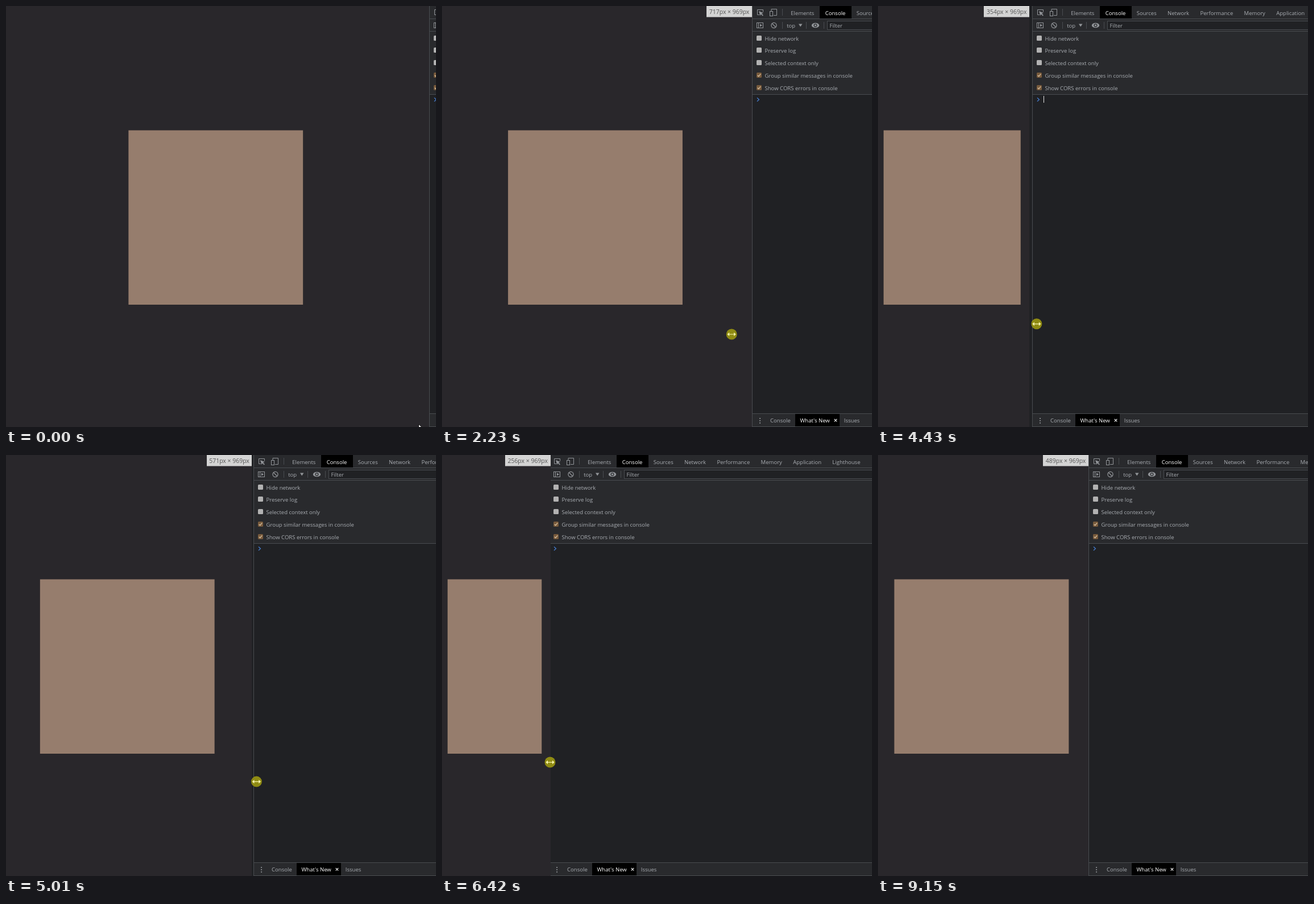
These frames come from a looping animation (756x740 px, 9.31 s). An HTML page with a canvas:

```html
<!DOCTYPE html>
<html lang="en">
<head>
<meta charset="utf-8">
<title>Resizing a page</title>
<style>
html, body { margin: 0; width: 100%; height: 100%; overflow: hidden; background: #29272b; }
canvas { display: block; }
</style>
</head>
<body>
<canvas id="stage" width="756" height="740"></canvas>
<script>
const ctx = document.getElementById('stage').getContext('2d');
const LOOP = 9310, W = 756, H = 740;
const FONT = '"Open Sans", "Noto Sans", sans-serif';
const C = {
  page: '#29272b', box: '#967d6d', panel: '#202124', bar: '#292a2d', line: '#494c50',
  text: '#a9adb2', bright: '#ffffff', icon: '#919498', check: '#775a3c'
};

// Each drag eases from one divider position to the next;
// the tools panel and the page trail the pointer by their own lag.
const SWINGS = [
  { start: 1060, time: 2568, from: 743.5, to: 193, panelLag: 118, pageLag: 118 },
  { start: 3960, time: 1225, from: 193, to: 450, panelLag: 16, pageLag: 32 },
  { start: 5185, time: 1235, from: 450, to: 187, panelLag: 58, pageLag: 94 },
  { start: 6770, time: 1483, from: 187, to: 370, panelLag: 77, pageLag: 154 }
];
const GRAB = 660, DRAG = 1100, RELEASE = 8300, LEAVE = 8400, GONE = 8690;

const clamp = u => Math.min(1, Math.max(0, u));
const ease = u => (1 - Math.cos(Math.PI * clamp(u))) / 2;
const mix = (a, b, u) => a + (b - a) * u;

function divider(t, lagName) {
  const s = SWINGS.findLast(s => t >= s.start) || SWINGS[0];
  return mix(s.from, s.to, ease((t - s.start - (s[lagName] || 0)) / s.time));
}

// The hand sinks along a shallow curve towards the right
const handY = x => 582 - 40 * Math.exp((197 - x) / 150);

function rect(x, y, w, h, color) {
  ctx.fillStyle = color;
  ctx.fillRect(x, y, w, h);
}

// Returns the width of the drawn text
function text(str, x, y, color = C.text, size = 9.55) {
  ctx.font = `${size}px ${FONT}`;
  ctx.fillStyle = color;
  ctx.fillText(str, x, y);
  return ctx.measureText(str).width;
}

function oval(x, y, rx, ry, color) {
  ctx.beginPath();
  ctx.ellipse(x, y, rx, ry, 0, 0, 7);
  ctx.fillStyle = color;
  ctx.fill();
}

function frame(x, y, w, h) {
  ctx.strokeStyle = C.icon;
  ctx.lineWidth = 1;
  ctx.strokeRect(x, y, w, h);
}

// Path strings keep small glyphs compact
function glyph(d, x, y, { fill, stroke, width = 1 }) {
  ctx.save();
  ctx.translate(x, y);
  const path = new Path2D(d);
  if (fill) { ctx.fillStyle = fill; ctx.fill(path); }
  if (stroke) { ctx.strokeStyle = stroke; ctx.lineWidth = width; ctx.stroke(path); }
  ctx.restore();
}

function drawIcons() {
  const pen = { stroke: C.icon }, ink = { fill: C.icon };
  // element picker, device toggle
  glyph('M4 9H0V0H10V4', 9.5, 6.5, pen);
  glyph('M0 0L8 3L5 4.2L8 7.2L6.7 8.4L3.8 5.4L2.5 8Z', 12, 9, ink);
  glyph('M0 4V0H9.5V11H4', 34, 5.5, pen);
  frame(31.5, 9.5, 5, 8);
  // sidebar toggle, clear, menu arrow
  frame(8.5, 29.5, 11, 9);
  rect(11, 30, 1, 8, C.icon);
  glyph('M0 0L4 2.5L0 5Z', 14, 31.5, ink);
  oval(38.5, 34, 5.2, 5.2, C.icon);
  oval(38.5, 34, 3.9, 3.9, C.bar);
  glyph('M0 0L6.4 6.4', 35.3, 30.8, { ...pen, width: 1.3 });
  glyph('M0 0H6.5L3.2 5Z', 82, 31.5, ink);
  // eye
  oval(111.5, 34, 6.7, 4.3, C.icon);
  oval(111.5, 34, 3, 3, C.bar);
  oval(111.5, 34, 1.8, 1.8, C.icon);

  rect(53, 5, 1, 12, C.line);
  for (const x of [53, 95, 126]) rect(x, 28, 1, 12, C.line);
}

function drawTabs() {
  const gap = 19.3;
  let x = 68.3;
  for (const name of ['Elements', 'Console', 'Sources', 'Network', 'Performance',
    'Memory', 'Application', 'Lighthouse']) {
    const active = name === 'Console';
    if (active) rect(119, 0, 56, 22, '#000');
    x += text(name, x, 15.5, active ? C.bright : C.text) + gap;
  }
}

function drawOption(label, i) {
  const y = Math.floor(52 + i * 21.8), on = i > 2;
  ctx.beginPath();
  ctx.roundRect(8, y, 9, 9, 1.5);
  ctx.fillStyle = on ? C.check : '#b2b2b2';
  ctx.fill();
  if (on) glyph('M0 2.4L1.9 4.3L5.4 0', 9.8, y + 2.4, { stroke: '#d8c0a0', width: 1.3 });
  text(label, 22.5, 60.5 + i * 21.9);
}

function drawDrawer() {
  for (let i = 0; i < 3; i++) rect(13.2, 724 + i * 4, 1.8, 1.8, C.icon);
  rect(76, 717, 78, 22, '#000');
  text('Console', 32, 732.3);
  text("What's New", 84.5, 732.3, C.bright);
  glyph('M0 0L4.6 4.6M4.6 0L0 4.6', 144.7, 726, { stroke: '#e4e4e4', width: 1.2 });
  text('Issues', 161.8, 732.3);
}

function drawPanel(edge, caret) {
  const w = W - edge;
  ctx.save();
  ctx.translate(edge, 0);
  rect(0, 0, w, H, C.panel);
  rect(0, 0, w, 155, C.bar);
  rect(0, 716, w, 24, C.bar);
  for (const y of [22, 44, 155, 716, 739]) rect(0, y, w, 1, C.line);

  drawIcons();
  drawTabs();
  text('top', 61.2, 37.5);
  rect(132, 26, w, 16, C.line);
  rect(133, 27, w, 14, C.panel);
  text('Filter', 136.5, 38.2);

  ['Hide network', 'Preserve log', 'Selected context only',
    'Group similar messages in console', 'Show CORS errors in console'].forEach(drawOption);

  glyph('M0 0L3.4 3.2L0 6.4', 9, 161.3, { stroke: '#4479c8', width: 1.4 });
  if (caret) rect(20, 158, 1, 12, '#e4e4e4');
  drawDrawer();
  rect(0, 0, 1, H, C.line);
  ctx.restore();
}

function drawPage(edge, label) {
  rect(0, 0, Math.round(edge), H, C.page);
  // 400px box, centred, shrinking once the margins are used up
  const size = Math.min(306.8, edge - 25.2);
  const left = Math.max(9.8, (edge - 6 - size) / 2);
  rect(left, 218.5, size, 306.5, C.box);
  if (label) {
    const x = Math.round(edge - 79.7);
    rect(x, 0, Math.round(edge) - x, 19.5, '#d4d4d4');
    text(`${Math.round((edge + 5.7) / 0.7677)}px × 969px`, edge - 75.2, 13.8, '#555', 10.45);
  }
}

function drawArrow(x, y) {
  glyph('M0 0V14L3.2 11L5.4 16L7.6 15L5.4 10.2L10 10Z', x, y, { fill: '#fff', stroke: '#111' });
}

function drawResizer(x, y, press) {
  ctx.globalAlpha = press;
  oval(x, y, 9.5, 9.5, '#8f8b13');
  ctx.globalAlpha = 1;
  glyph('M-7.5 0L-4 -3.3V-.6H4V-3.3L7.5 0L4 3.3V.6H-4V3.3Z', x, y,
    { fill: press > 0 ? '#fbf8b0' : '#fff' });
}

function drawPointer(t) {
  if (t < 300) {
    const u = ease(t / 350);
    drawArrow(mix(725.5, 746.5, u), mix(735, 582, u));
  } else if (t < LEAVE) {
    const x = divider(t) + 3;
    drawResizer(x, handY(x), t < RELEASE ? clamp((t - GRAB) / 60) : 0);
  } else if (t < GONE) {
    const u = ease((t - LEAVE) / (GONE - LEAVE));
    drawArrow(mix(373, 615, u), mix(570, 735, u));
  }
}

function draw(t) {
  const blink = (t + 390) % 1060 >= 530;
  rect(0, 0, W, H, C.panel);
  drawPanel(Math.round(divider(t, 'panelLag')), blink);
  drawPage(divider(t, 'pageLag'), t >= DRAG);
  drawPointer(t);
}

const start = performance.now();
function tick() {
  draw((performance.now() - start) % LOOP);
  requestAnimationFrame(tick);
}
tick();
</script>
</body>
</html>
```
